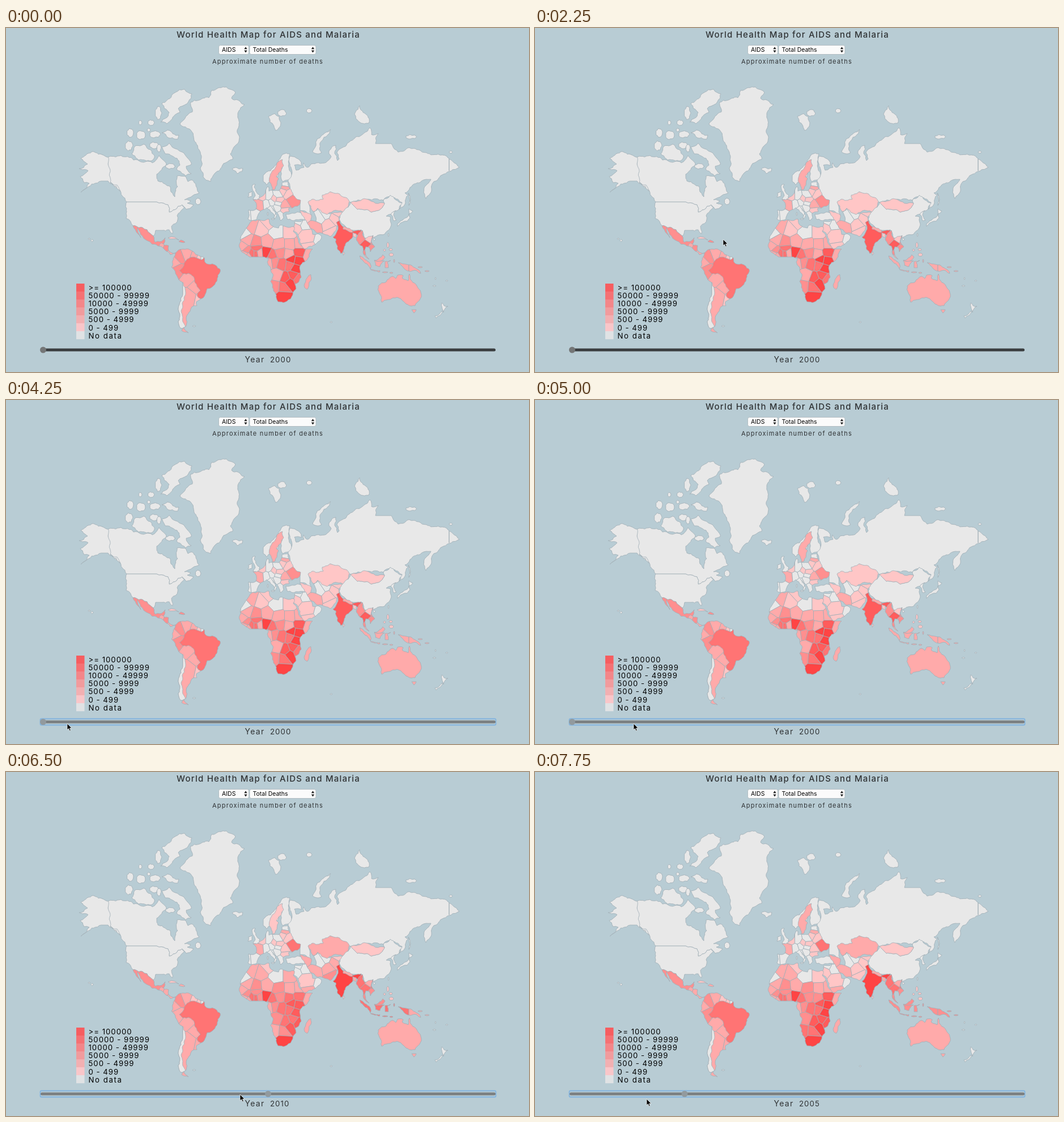
Animation, 923 px wide and 607 px high, one loop 8000 ms. Source, as an HTML page:

```html
<!DOCTYPE html>
<html lang="en">
<head>
<meta charset="utf-8">
<title>World health map</title>
<style>
html, body { margin: 0; width: 100%; height: 100%; overflow: hidden; background: #b8ccd4; }
svg { display: block; width: 923px; height: 607px; font-family: Inter, "Open Sans", sans-serif; }
#map path { stroke: #a0aeb5; stroke-width: .8; stroke-linejoin: round; }
</style>
</head>
<body>
<svg id="stage" viewBox="0 0 923 607" xmlns="http://www.w3.org/2000/svg"></svg>
<script>
const stage = document.getElementById('stage');
// n: no data, then a (fewest) to f (most).
const shades = { n: '#e8e8e8', a: '#ffc6c6', b: '#ffaaaa', c: '#ff8f8f', d: '#ff7474', e: '#ff5c5c', f: '#ff4444' };
const regions = [];

function add(tag, attrs, text, parent = stage) {
  const node = document.createElementNS(stage.namespaceURI, tag);
  for (const key in attrs) node.setAttribute(key, attrs[key]);
  if (text) node.textContent = text;
  return parent.appendChild(node);
}

add('rect', { width: 923, height: 607, fill: '#b8ccd4' });
const map = add('g', { id: 'map' });

// Breaks an edge into a jagged coast; level and upright edges stay straight.
function jagged([ax, ay], [bx, by]) {
  const length = Math.hypot(bx - ax, by - ay);
  if (length < 5 || ax === bx || ay === by) return [[ax, ay]];
  const x = (ax + bx) / 2, y = (ay + by) / 2;
  const turn = x * 12.9 + y * 78.2, push = Math.min(length * .13, 2.2);
  const mid = [x + push * Math.sin(turn), y + push * Math.cos(turn)];
  return [...jagged([ax, ay], mid), ...jagged(mid, [bx, by])];
}
const parse = text => text.split(' ').map(pair => pair.split(',').map(Number));
const path = points => 'M' + points.map(p => p.map(v => v.toFixed(1))).join(' ') + 'Z';
const coast = points => path(points.flatMap((p, i) => jagged(p, points[(i + 1) % points.length])));

function region(levels, d, parent = map) {
  regions.push({ levels, node: add('path', { d }, '', parent) });
}
const land = (levels, outline) => region(levels, coast(parse(outline)));

// Rounded islands: centre and radii.
function isles(levels, list) {
  for (const [x, y, rx, ry] of parse(list)) {
    const ring = [0, 1, 2, 3, 4, 5, 6].map(i => i * Math.PI / 3.5);
    region(levels, coast(ring.map(a => [x + rx * Math.cos(a), y + ry * Math.sin(a)])));
  }
}

// The part of the stage nearer to this site than to any other.
function cell(site, sites) {
  let poly = [[0, 0], [923, 0], [923, 607], [0, 607]];
  for (const other of sites) {
    if (other === site) continue;
    const side = ([x, y]) => Math.hypot(x - site.x, y - site.y) ** 2 - Math.hypot(x - other.x, y - other.y) ** 2;
    poly = poly.flatMap((p, i) => {
      const q = poly[(i + 1) % poly.length], a = side(p), b = side(q), k = a / (a - b);
      const kept = a <= 0 ? [p] : [];
      return a * b < 0 ? [...kept, [p[0] + (q[0] - p[0]) * k, p[1] + (q[1] - p[1]) * k]] : kept;
    });
  }
  return poly;
}

// A landmass shared out between neighbours.
function nations(id, outline, list) {
  const d = coast(parse(outline));
  add('path', { d }, '', add('clipPath', { id }));
  const group = add('g', { 'clip-path': `url(#${id})` }, '', map);
  const sites = list.split('; ').map(entry => {
    const [, levels, place] = entry.split(' ');
    const [x, y] = place.split(',').map(Number);
    return { levels, x, y };
  });
  sites.forEach(site => region(site.levels, path(cell(site, sites)), group));
  add('path', { d, fill: 'none' }, '', map);
}

// Greenland and the Arctic
land('n', '307,170 329,148 326,131 358,123 363,110 389,104 405,114 398,124 421,135 411,146 408,180 411,200 396,222 400,232 384,239 361,271 348,263 343,248 345,228 338,207 328,183');
land('n', '275,133 300,113 315,108 328,116 322,130 304,142 307,149 284,169 273,166 288,149');
land('n', '275,185 285,180 305,189 303,196 287,194');
land('n', '222,222 227,209 243,205 262,225 258,234 234,233');
land('n', '275,210 288,203 311,219 327,241 318,244 327,257 317,261 301,249 307,242 302,230 281,222');
isles('n', '269,150,6,12 217,208,7,9 219,185,6,8 238,189,8,8 263,188,10,6 261,207,8,6 270,212,4,7 237,167,3,4 256,167,6,5 290,244,9,5 252,180,3,3 339,306,5,6');
land('n', '399,249 405,246 418,248 417,253 409,257');
land('n', '463,156 474,151 482,156 485,167 476,181 466,166');
isles('n', '487,150,8,6 535,146,5,4 715,192,10,4 785,219,3,2');
land('n', '541,218 549,196 573,179 571,186 554,203 557,220 549,222');
land('n', '615,152 624,137 641,160 640,168 624,166');

// North America
land('n', '180,228 203,225 225,233 258,238 270,225 283,239 266,258 268,270 289,279 291,289 298,298 303,280 302,261 318,263 321,271 328,268 337,282 341,291 315,303 326,305 320,309 331,312 318,320 311,312 288,325 286,312 266,307 213,307 202,288 180,270');
land('n', '180,228 152,218 132,230 144,240 129,248 145,252 131,262 138,273 147,274 132,290 157,274 168,270 180,270 196,277 202,288 184,273');
land('n', '213,307 266,307 286,312 288,325 311,312 315,317 302,331 303,338 292,350 294,363 288,356 276,357 264,357 260,367 249,356 224,349 212,336 211,315');
isles('n', '147,372,2,1 152,375,2,2');
land('c', '224,349 249,356 260,367 263,378 272,377 281,370 279,380 270,385 247,374 232,353 238,370 230,360');
nations('isthmus', '270,385 274,379 287,384 288,394 299,397 290,400 279,390', 'guatemala b 274,384; honduras cbb 283,387; panama b 291,397');
land('a', '286,370 292,368 305,374 297,372');
land('cbb', '305,377 309,374 316,378');

// South America
nations('andes', '299,397 304,392 312,390 328,393 341,402 349,405 346,410 330,420 335,445 345,465 344,478 336,483 337,490 328,492 325,500 318,511 317,527 309,530 304,518 306,488 312,470 312,449 304,442 299,433 292,422 294,411',
  'colombia c 306,404; venezuela b 319,399; guyana baa 333,404; suriname a 341,406; guiana n 347,406; ecuador b 297,413; peru ccb 304,427; bolivia b 322,441; paraguay b 336,456; uruguay abb 346,479; argentina b 322,474');
land('d', '318,410 331,404 345,409 350,405 351,413 358,417 369,418 378,426 374,436 370,449 366,455 355,460 353,467 344,478 337,472 343,463 336,452 332,441 322,433 312,434 306,428 314,419');
land('n', '312,449 316,458 311,486 312,510 317,527 309,530 304,518 306,488 312,470');
land('b', '314,529 322,538 310,534');
isles('n', '332,526,3,1 574,519,2,1');

// Russia
land('n', '502,226 521,237 521,243 509,242 512,251 526,246 525,238 531,246 548,238 567,235 574,227 570,222 575,210 582,207 580,221 585,234 588,231 584,219 590,213 606,201 629,188 642,176 645,188 657,186 652,204 680,204 692,219 711,211 742,220 770,224 800,246 782,253 755,271 751,284 741,301 737,290 750,267 726,273 704,291 710,294 705,308 694,320 699,308 679,296 666,304 630,303 605,307 572,289 553,304 534,307 539,330 519,322 519,304 503,296 498,271 504,259');
land('n', '782,231 782,252');
land('n', '710,291 714,303 711,313');

// Europe
land('n', '501,222 488,223 481,233 467,252 454,260 454,271 460,277 468,270 480,262 488,244 485,262 489,271 498,268 504,259 499,240');
land('bba', '488,232 478,238 468,256 466,273 470,286 475,284 481,266 477,262 490,243');
nations('europe', '427,337 428,321 441,320 442,312 436,303 444,301 450,298 458,290 461,280 464,281 464,288 481,287 486,280 487,273 498,272 503,285 507,295 520,304 519,310 505,318 499,318 500,324 489,327 490,335 485,340 480,328 468,316 478,330 474,337 472,328 460,317 449,323 443,337 434,340',
  'portugal n 426,330; spain n 438,329; france b 448,311; lowlands a 453,297; germany n 464,297; alps n 460,310; italy n 469,321; austria n 469,307; czechia a 473,302; poland n 480,294; estonia n 493,276; latvia b 492,282; lithuania a 490,288; belarus a 497,292; ukraine cdd 505,304; romania baa 491,313; bulgaria a 492,322; hungary n 480,309; slovakia a 481,304; balkans n 478,317; greece n 485,331');
land('n', '435,277 440,276 438,281 448,295 447,301 436,303 440,296');
land('n', '428,291 434,288 434,297 427,299');
isles('n', '462,328,1,3 471,337,3,1');

// West and central Asia
land('n', '494,328 520,326 528,330 529,338 508,340 496,337');
nations('arabia', '510,341 530,338 536,352 541,364 550,363 557,368 548,380 527,390 519,373 508,358',
  'syria n 517,341; iraq n 527,346; jordan aan 512,352; saudi a 529,366; yemen abb 533,392; oman n 560,374');
nations('persia', '518,323 539,330 538,340 547,341 543,325 552,317 570,328 588,325 596,325 587,334 588,340 587,347 578,362 572,368 562,364 550,362 538,354 530,340',
  'caucasus abb 528,329; iran b 546,351; turkmens n 554,334; uzbeks n 563,328; kyrgyz a 586,327; tajiks aab 581,336; afghans aab 569,347; pakistan aac 575,360');
land('abb', '533,307 540,302 552,304 560,302 558,295 572,289 582,292 589,293 606,306 603,317 595,325 577,323 567,329 550,318 542,324 538,314');

// East and south Asia
land('n', '588,337 595,324 604,316 608,308 620,320 645,325 664,317 668,309 666,303 678,295 699,308 694,319 671,332 679,334 680,346 668,364 650,369 634,372 628,357 606,357 594,346');
land('a', '608,308 629,302 645,306 668,309 664,317 645,325 620,320');
land('n', '688,322 684,330 689,339 684,340 679,329');
land('n', '711,319 718,323 711,328 713,335 708,341 694,347 691,350 691,345 700,339 708,334');
isles('n', '650,373,2,2 675,365,1,3');
land('eff', '583,343 589,340 596,352 612,359 627,356 622,367 612,362 612,369 599,381 595,394 591,398 583,381 582,372 577,369 586,350');
land('b', '596,350 612,357 611,361 595,355');
land('abb', '612,361 618,363 618,370 613,368');
land('a', '595,393 598,398 595,401');
nations('indochina', '629,357 633,371 648,366 645,374 651,386 643,395 641,387 635,386 634,395 641,408 636,405 630,395 629,385 618,372',
  'burma cdd 627,370; thailand edd 637,380; laos abb 641,374; vietnam cdd 649,376; cambodia c 645,389; malaysia bcc 638,416');

// Malay islands and Oceania
land('bcd', '624,402 630,405 644,419 643,425 631,412');
land('bcd', '650,410 662,411 668,411 660,421 652,419');
land('bcc', '650,410 657,408 665,400 669,404 662,411');
land('bcd', '643,426 660,428 659,431');
land('bcd', '669,412 679,410 673,414 675,423 669,423');
isles('bcd', '669,431,5,1 680,432,3,1 685,411,1,3');
land('bcd', '692,414 711,418 711,429 700,421');
land('bcb', '711,418 722,423 732,433 718,428 711,429');
isles('bcb', '731,422,4,1 743,429,4,1');
isles('a', '674,383,2,5 680,400,4,3 668,392,2,2 679,391,3,2');
land('b', '657,455 671,448 682,438 688,442 691,436 701,437 699,441 710,446 712,434 718,449 733,470 731,478 722,490 709,488 701,482 690,475 663,484 659,468');
land('b', '716,497 724,497 720,503');
land('n', '769,485 773,490 780,491 772,502');
land('n', '770,499 766,507 759,512 757,508');
isles('n', '756,455,3,1 758,442,1,2 778,446,2,1');

// Africa
nations('africa', '434,340 449,339 464,337 466,346 481,353 483,348 492,350 509,351 507,359 516,377 526,390 541,390 535,404 520,418 521,440 510,452 512,460 506,471 496,482 480,483 472,464 467,447 471,434 467,422 461,413 463,406 456,404 440,404 430,404 420,397 412,387 414,371 427,349',
  'morocco b 434,350; sahara n 420,363; algeria abb 450,355; tunisia a 463,343; libya n 477,361; egypt aab 501,361; mauritania b 426,374; mali c 441,379; niger b 461,377; chad bcc 481,382; sudan b 502,382; senegal b 418,386; guinea c 424,393; sierra b 422,398; liberia b 428,402; ivory d 434,398; burkina dcc 442,389; ghana d 441,398; benin bcc 447,397; nigeria f 458,396; cameroon d 470,402; ubangi c 484,397; nile bcd 499,399; ethiopia eed 517,396; eritrea b 517,381; somalia b 535,402; gabon b 465,413; congo c 473,412; kinshasa d 487,416; uganda fee 504,409; kenya ffe 515,411; rwanda d 501,418; tanzania ffe 511,424; angola bcc 478,436; zambia eed 494,442; malawi eed 507,437; mozambique dee 515,443; zimbabwe ffe 500,449; namibia cdb 474,456; botswana ddc 490,457; cape f 489,474');
land('b', '538,435 539,441 532,461 527,458 529,446');

const label = (x, y, size, spacing, text, fill = '#303335', weight = 400) =>
  add('text', { x, y, 'font-size': size, 'letter-spacing': spacing, fill, 'font-weight': weight }, text);

function select(x, width, text) {
  add('rect', { x, y: 30.5, width, height: 16, rx: 3, fill: '#fbfbfb', stroke: '#a9b4b9', 'stroke-width': .8 });
  label(x + 5.5, 42.3, 10.5, 0, text, '#000');
  const mid = x + width - 5.5;
  add('path', { d: `M${mid - 2.7} 37.3h5.4l-2.7-4zM${mid - 2.7} 39.5h5.4l-2.7 4z`, fill: '#222' });
}

label(301, 17, 15, 1.2, 'World Health Map for AIDS and Malaria', '#303335', 500);
select(375.5, 53, 'AIDS');
select(430, 117, 'Total Deaths');
label(364, 62.5, 11, 1.25, 'Approximate number of deaths');

const legend = {
  '>= 100000': '#f65d60', '50000 - 99999': '#f57174', '10000 - 49999': '#f38689',
  '5000 - 9999': '#f19b9d', '500 - 4999': '#f2b0b2', '0 - 499': '#f9c6c9', 'No data': '#e0e2e4'
};
Object.entries(legend).forEach(([text, fill], i) => {
  add('rect', { x: 124, y: 451 + 14 * i, width: 14.5, height: 14.2, fill });
  label(145.5, 463 + 14.1 * i, 13.2, text === 'No data' ? 1.6 : 1, text, '#000');
});

const ring = add('rect', { x: 60.5, y: 562.5, width: 804, height: 11, rx: 2, fill: 'none', stroke: '#83b4df', 'stroke-width': 1.8 });
const track = add('rect', { x: 61, y: 565.5, width: 803, height: 5, rx: 2.5 });
const knob = add('circle', { cy: 568, r: 5.5 });
label(421.5, 590, 14, 1.3, 'Year');
const yearText = label(466, 590, 13.3, 1, '2000');
const pointer = add('path', { d: 'M0 0V11L2.6 8.7 4.3 12.7 6.2 11.9 4.5 8H8Z', fill: '#000', stroke: '#fff', 'stroke-width': .7 });

// Time, pointer x and y, year.
const keys = [
  [1250, 800, 2, 2000], [2250, 332, 373, 2000], [2500, 304, 400, 2000], [3250, 75, 567, 2000],
  [3500, 64, 571, 2000], [3750, 64, 571, 2000], [5000, 174, 571, 2000], [6000, 334, 569, 2005],
  [6250, 432, 569, 2008], [6500, 413, 569, 2010], [7250, 182, 574, 2005], [7750, 197, 577, 2005]
];
const LOOP = 8000, TICK = 250, FOCUS_AT = 3750;

function pose(time) {
  const next = keys.findIndex(key => key[0] > time);
  if (next < 0) return keys[keys.length - 1];
  if (next === 0) return [time, -20, -20, 2000];
  const from = keys[next - 1], to = keys[next];
  const k = (time - from[0]) / (to[0] - from[0]);
  return from.map((v, i) => v + (to[i] - v) * k);
}

let shown = -1;
function draw(now) {
  const time = Math.floor(now % LOOP / TICK) * TICK;
  if (time !== shown) {
    shown = time;
    const [, x, y, exactYear] = pose(time);
    const year = Math.round(exactYear), focused = time >= FOCUS_AT;
    const period = year < 2003 ? 0 : year < 2008 ? 1 : 2;
    regions.forEach(({ levels, node }) => node.setAttribute('fill', shades[levels[period] || levels[0]]));
    pointer.setAttribute('transform', `translate(${x} ${y})`);
    knob.setAttribute('cx', 65.5 + 39.7 * (year - 2000));
    knob.setAttribute('fill', focused ? '#929a9e' : '#747677');
    track.setAttribute('fill', focused ? '#7b7f81' : '#3a3d3f');
    ring.setAttribute('visibility', focused ? 'visible' : 'hidden');
    yearText.textContent = year;
  }
  requestAnimationFrame(() => draw(performance.now() - began));
}
const began = performance.now();
draw(0);
</script>
</body>
</html>
```
